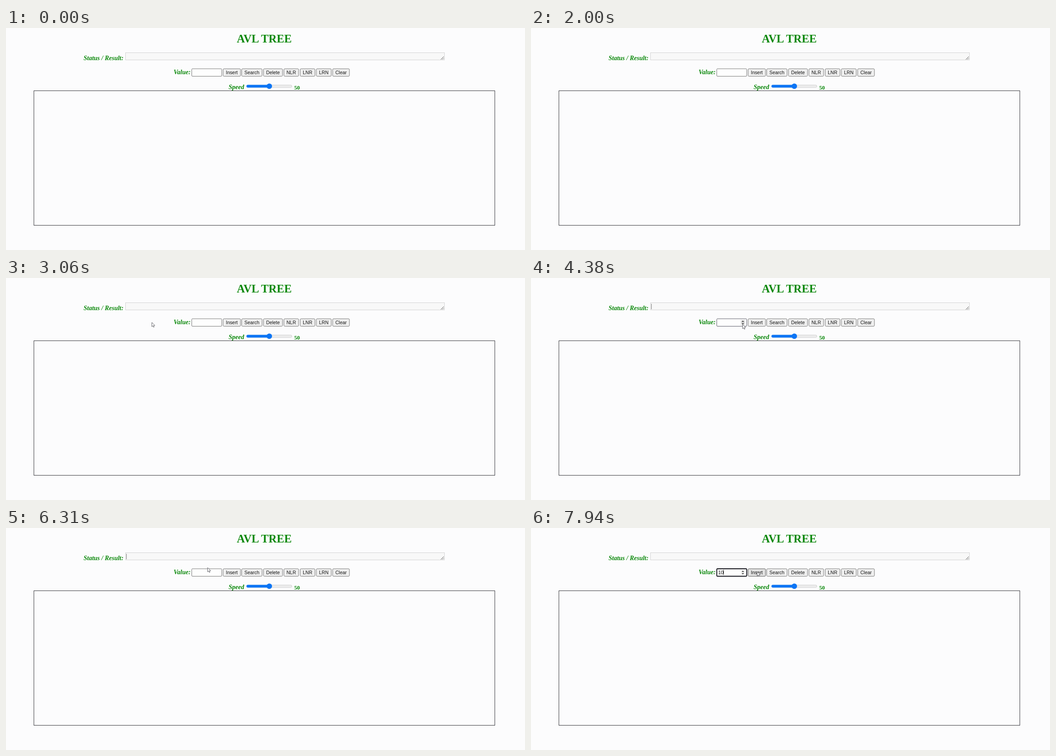
An HTML page that plays this animation: 1144 by 490 pixels, repeating every 8 s.

```html
<!DOCTYPE html>
<html lang="en">
<head>
<meta charset="utf-8">
<title>AVL tree</title>
<style>
html, body { margin: 0; width: 100%; height: 100%; overflow: hidden; background: #fcfcfd; }
svg { display: block; width: 1144px; height: 490px; }
.serif { font-family: "Liberation Serif", "Times New Roman", serif; font-weight: bold; fill: #0b880b; }
.label { font-size: 14px; font-style: italic; }
.ui { font: 10.4px "Liberation Sans", Arial, sans-serif; fill: #111; }
.button rect { fill: #efefef; stroke: #767676; }
.button.hover rect { fill: #e2e2e2; stroke: #555; }
</style>
</head>
<body>
<svg viewBox="0 0 1144 490">
  <rect width="1144" height="490" fill="#fcfcfd"/>
  <text class="serif" x="569.3" y="31.6" font-size="24.8" text-anchor="middle">AVL TREE</text>

  <text class="serif label" x="171" y="71">Status / Result:</text>
  <rect x="263.5" y="54.5" width="703" height="16" fill="#f8f8f8" stroke="#d3d3d3"/>
  <path d="M958.5 69.5l6.5-6.5M962 69.5l3-3" stroke="#555" fill="none"/>
  <path id="areaCaret" d="M265.5 57v12" stroke="#777"/>

  <text class="serif label" x="369.5" y="102">Value:</text>
  <rect id="field" x="409.5" y="90" width="66" height="16.5" rx="1.5" fill="#fefefe"/>
  <text id="typed" class="ui" x="412.7" y="101.8"></text>
  <path id="fieldCaret" stroke="#111"/>
  <g id="spin">
    <rect id="spinBack" x="462" y="92.5" width="10" height="12" fill="#e6e6e6"/>
    <path d="M464 97l3-3.2 3 3.2zM464 99.6l3 3.2 3-3.2z" fill="#505050"/>
  </g>
  <g id="buttons"></g>

  <text class="serif label" x="490.7" y="134.6">Speed</text>
  <rect x="530.5" y="126" width="99.5" height="5" rx="2.5" fill="#efefef" stroke="#bdbdbd" stroke-width=".8"/>
  <rect x="530" y="125.6" width="50" height="5.8" rx="2.9" fill="#0b75f5"/>
  <circle cx="580.4" cy="128.5" r="6" fill="#0b75f5"/>
  <text class="serif" x="635.3" y="135.8" font-size="12.5">50</text>

  <rect x="61.5" y="138.5" width="1016" height="297" fill="none" stroke="#35353a"/>
  <path id="cursor" d="M.5.5v9.4l2.2-2 1.5 3.3 1.5-.7-1.5-3.2h3z" fill="#fff" stroke="#55555c" stroke-width=".9"/>
</svg>
<script>
const LOOP = 8000, BLINK = 1060;
const $ = id => document.getElementById(id);
const show = (el, on) => { el.style.visibility = on ? "visible" : "hidden"; };

// label, left edge, width
const buttons = [
  ["Insert", 478.5, 38.5], ["Search", 519.5, 45], ["Delete", 567.5, 42],
  ["NLR", 612.5, 32.5], ["LNR", 648.5, 32.5], ["LRN", 684, 33], ["Clear", 720, 37]
];
$("buttons").innerHTML = buttons.map(([name, x, w]) =>
  `<g class="button"><rect x="${x}" y="90" width="${w}" height="16.5" rx="2"/>` +
  `<text class="ui" x="${x + w / 2}" y="101.8" text-anchor="middle">${name}</text></g>`).join("");
const insert = document.querySelector(".button");

// pointer path: time, x, y
const path = [
  [2480, 330, 430], [2900, 321, 97.5], [3200, 321, 97.5], [3700, 330, 62],
  [4050, 340, 64], [4360, 466, 102], [4600, 466, 102], [4900, 440, 98],
  [6100, 438, 98], [6300, 444, 87], [6350, 444, 87], [6500, 440, 98],
  [7450, 440, 98], [7720, 498, 96], [LOOP, 498, 96]
];
const AREA_CLICK = 4000, FIELD_CLICK = 6650, KEY_ONE = 7150, KEY_ZERO = 7420;

function pointer(t) {
  const i = path.findIndex(p => p[0] > t);
  if (i < 1) return null;
  const [t0, x0, y0] = path[i - 1], [t1, x1, y1] = path[i];
  const u = (t - t0) / (t1 - t0), e = u * u * (3 - 2 * u);
  return { x: x0 + (x1 - x0) * e, y: y0 + (y1 - y0) * e };
}

const inside = (p, x, y, w, h) => !!p && p.x >= x && p.x <= x + w && p.y >= y && p.y <= y + h;
const blinkOn = (t, start) => (t - start) % BLINK < BLINK / 2;

function draw(t) {
  const p = pointer(t);
  const inArea = inside(p, 263, 54, 704, 17);
  const inField = inside(p, 409, 89.5, 67, 17.5);
  const onSpin = inside(p, 461, 90, 14, 16.5);
  const focused = t >= FIELD_CLICK;

  // The pointer is not drawn over editable text.
  show($("cursor"), p && !inArea && (!inField || onSpin));
  if (p) $("cursor").setAttribute("transform", `translate(${p.x} ${p.y})`);

  show($("spin"), inField || focused);
  show($("spinBack"), onSpin);
  insert.classList.toggle("hover", inside(p, 478, 90, 39, 16.5));

  $("field").setAttribute("stroke", focused ? "#101018" : inField ? "#5c5c68" : "#767676");
  $("field").setAttribute("stroke-width", focused ? 1.9 : 1);

  const text = t >= KEY_ZERO ? "10" : t >= KEY_ONE ? "1" : "";
  $("typed").textContent = text;
  const x = 412.9 + text.length * 5.8;
  $("fieldCaret").setAttribute("d", `M${x} 92.5v11`);
  const lastInput = [FIELD_CLICK, KEY_ONE, KEY_ZERO][text.length];
  show($("fieldCaret"), focused && blinkOn(t, lastInput));
  show($("areaCaret"), t >= AREA_CLICK && !focused && blinkOn(t, AREA_CLICK));
}

const start = performance.now();
function tick() {
  draw((performance.now() - start) % LOOP);
  requestAnimationFrame(tick);
}
tick();
</script>
</body>
</html>
```
